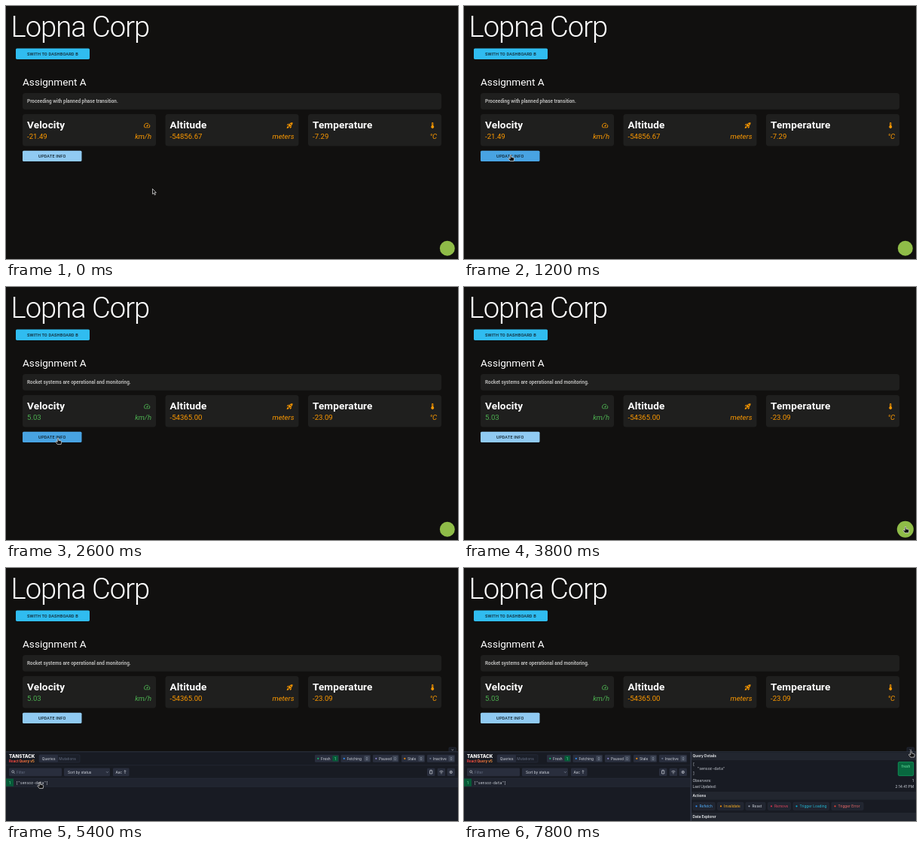
An HTML page for the animation above (8000 ms loop, 600x337 px).

```html
<!DOCTYPE html>
<html lang="en">
<head>
<meta charset="utf-8">
<title>Dashboard</title>
<style>
html, body { margin: 0; width: 100%; height: 100%; overflow: hidden; background: #11100f; }
svg { display: block; width: 100%; height: 100%; }
text { font-family: Roboto, sans-serif; white-space: pre; }
.ui text { font-family: Inter, sans-serif; }
.ui text.mono { font-family: "Noto Sans Mono", monospace; }
</style>
</head>
<body>
<svg id="stage" viewBox="0 0 600 337" preserveAspectRatio="none"></svg>
<script>
const LOOP = 8000, STEP = 200;
const UPDATE = 1600, OPEN = 4000, LABELS = 4200, DETAILS = 5600;
const ORANGE = '#fb9800', GREEN = '#4caf50';
const LINE = '#2b303f', PANEL = '#181b23', FIELD = '#292e3d', PALE = '#d0d5dd';

const rect = (x, y, w, h, fill, r = 0, extra = '') =>
  `<rect x="${x}" y="${y}" width="${w}" height="${h}" rx="${r}" fill="${fill}" ${extra}/>`;
const text = (x, y, size, fill, str, extra = '') =>
  `<text x="${x}" y="${y}" font-size="${size}" fill="${fill}" ${extra}>${str}</text>`;
const path = (d, extra) => `<path d="${d}" ${extra}/>`;
const BOLD = 'font-weight="700"', SEMI = 'font-weight="600"', MED = 'font-weight="500"';
const END = 'text-anchor="end"', MID = 'text-anchor="middle"';

const ICONS = {
  speed: 'M20.38 8.57l-1.23 1.85a8 8 0 0 1-.22 7.58H5.07A8 8 0 0 1 15.58 6.85l1.85-1.23A10 10 0 0 0 3.35 19a2 2 0 0 0 1.72 1h13.85a2 2 0 0 0 1.74-1 10 10 0 0 0-.27-10.44zm-9.79 6.84a2 2 0 0 0 2.83 0l5.66-8.49-8.49 5.66a2 2 0 0 0 0 2.83z',
  rocket: 'M9.2 6.3C7.2 8.6 5.8 11.9 5.6 12.2L2 10.7l4-4c.5-.5 1.2-.7 1.9-.6zM11.2 17s3.7-1.6 5.9-3.7c5.4-5.4 4.5-9.6 4.2-10.6-1-.3-5.2-1.2-10.6 4.2C8.5 9.1 7 12.8 7 12.8zm6.5-2.2c-2.3 2-5.6 3.4-5.9 3.6L13.3 22l4-4c.5-.5.7-1.2.6-1.9zM9 18c0 .8-.3 1.6-.9 2.1C6.9 21.3 2 22 2 22s.7-4.9 1.9-6.1A3 3 0 0 1 9 18zm4-9a2 2 0 1 1 4 0 2 2 0 0 1-4 0z',
  thermo: 'M15 13V5a3 3 0 0 0-6 0v8a5 5 0 1 0 6 0zm-4-8a1 1 0 0 1 2 0h-1v1h1v2h-1v1h1v2h-2z'
};

function card(x, title, value, unit, icon, color) {
  return rect(x, 144, 177, 42.5, '#1f1f1e', 3.5) +
    text(x + 6, 163.3, 13.6, '#fff', title, BOLD + ' letter-spacing=".1"') +
    path(ICONS[icon], `transform="translate(${x + 160.4} 154.2) scale(.4)" fill="${color}" fill-rule="evenodd"`) +
    text(x + 6, 177, 9.6, color, value) +
    text(x + 171, 177, 9.6, color, unit, END + ' font-style="italic"');
}

function button(x, y, w, fill, label) {
  return rect(x, y + .6, w, 14.4, '#000', 1.6, 'opacity=".3"') +
    rect(x, y, w, 14.4, fill, 1.6) +
    text(x + w / 2, y + 9.2, 5.6, '#10222c', label, `${MID} ${MED} letter-spacing=".15"`);
}

function page(t, hover) {
  const fresh = t >= UPDATE;
  return text(6.5, 41.4, 38.2, '#fff', 'Lopna Corp', 'font-weight="300" letter-spacing="-1"') +
    button(13, 56.5, 98, '#30bcf0', 'SWITH TO DASHBOARD B') +
    text(22, 106, 13.6, '#fff', 'Assignment A') +
    rect(22, 116, 556, 21.8, '#1f1f1e', 3.5) +
    text(28, 129.3, 6.4, '#b9b9b8', fresh ? 'Rocket systems are operational and monitoring.' : 'Proceeding with planned phase transition.', BOLD) +
    card(22, 'Velocity', fresh ? '5.03' : '-21.49', 'km/h', 'speed', fresh ? GREEN : ORANGE) +
    card(211.5, 'Altitude', fresh ? '-54365.00' : '-54856.67', 'meters', 'rocket', ORANGE) +
    card(401, 'Temperature', fresh ? '-23.09' : '-7.29', '°C', 'thermo', ORANGE) +
    button(22, 192.7, 78.5, hover ? '#48a3e2' : '#90caf2', 'UPDATE INFO');
}

const STATES = [
  // left, width, label, count, dot
  [410, 32, 'Fresh', 1, '#12b76a'], [444.5, 39.5, 'Fetching', 0, '#2e90fa'],
  [487, 34.5, 'Paused', 0, '#8a83c9'], [525, 31, 'Stale', 0, '#f79009'], [559, 37, 'Inactive', 0, '#667085']
];

function pill([x, w, label, count, dot], shift, full) {
  x += shift;
  const on = count > 0;
  return rect(x, 248.8, w, 10, FIELD, 1.2) +
    `<circle cx="${x + 4.3}" cy="253.8" r="1.1" fill="${dot}"/>` +
    rect(x + w - 8.6, 250, 7.4, 7.6, on ? '#075a38' : '#3f4656', 1) +
    (full ? text(x + 8, 255.5, 4.8, PALE, label) +
      text(x + w - 4.9, 255.5, 4.8, on ? '#6ce9a6' : '#98a2b3', count, MID) : '');
}

function tools(shift) {
  const ink = `fill="none" stroke="${PALE}" stroke-width=".7"`;
  return [559, 572.7, 585.5].map(x => rect(x + shift, 266.8, 10.4, 10.2, FIELD, 1.2)).join('') +
    `<g transform="translate(${shift})">` +
    path('M562 270h4.4M562.6 270.4v3.6h3.2v-3.6M563.4 269.2h1.6', ink) +
    path('M575.4 271.2q2.5-2 5 0M576.6 272.6q1.3-1 2.6 0M577.9 273.4v1', ink) +
    `<circle cx="590.7" cy="271.9" r="1.7" ${ink}/><circle cx="590.7" cy="271.9" r=".5" ${ink}/></g>`;
}

function list(t, hover) {
  const full = t >= LABELS, shift = t >= DETAILS ? -300 : 0;
  const tab = full ? 44 : 49.3, sort = full ? 61 : 64, asc = full ? 142 : 144.2;
  const width = shift ? 300.5 : 600;
  let s = rect(0, 280, width, 11, hover || shift ? '#20242f' : '#1c1f29') +
    rect(0, 262.6, width, .5, LINE) + rect(0, 279.8, width, .5, LINE) + rect(0, 291, width, .5, LINE) +
    rect(0, 280.6, 10, 10.2, '#075a38') +
    rect(tab, 248.8, 54, 10, '#1b1f29', 1.2, `stroke="${LINE}" stroke-width=".6"`) +
    rect(tab, 248.8, 25, 10, FIELD, 1.2) +
    STATES.map(p => pill(p, shift, full)).join('') +
    rect(4, 266.6, 70, 10.6, FIELD, 1.2) +
    `<circle cx="9.2" cy="271.3" r="1.5" fill="none" stroke="${PALE}" stroke-width=".6"/>` +
    path('M10.3 272.4l1.4 1.4', `stroke="${PALE}" stroke-width=".6"`) +
    rect(77, 266.6, sort, 10.6, FIELD, 1.2) +
    path(`M${72 + sort} 271.2l1.4 1.4 1.4-1.4`, 'fill="none" stroke="#98a2b3" stroke-width=".6"') +
    rect(asc, 266.6, 21.5, 10.6, FIELD, 1.2) +
    path(`M${asc + 16} 274v-4.4m-1.3 1.3l1.3-1.3 1.3 1.3`, `fill="none" stroke="${PALE}" stroke-width=".6"`) +
    tools(shift);
  if (full) {
    s += text(4, 253.2, 6.2, '#fff', 'TANSTACK', 'font-weight="800"') +
      text(4, 259, 4.5, 'url(#flame)', 'React Query v5', BOLD) +
      text(47.8, 255.5, 4.8, PALE, 'Queries') +
      text(70.3, 255.5, 4.8, '#667085', 'Mutations') +
      text(14, 273.6, 4.8, '#667085', 'Filter') +
      text(82, 273.6, 4.8, PALE, 'Sort by status') +
      text(145.5, 273.6, 4.8, PALE, 'Asc') +
      text(5, 287.6, 4.8, '#6ce9a6', 1, MID) +
      text(13, 287.5, 4.8, PALE, '["sensor-data"]', 'class="mono"');
  }
  return s;
}

const ACTIONS = [
  [304, 29, 'Refetch', '#53b1fd', '#2e90fa'], [336.5, 34.5, 'Invalidate', '#fdb022', '#f79009'],
  [374, 26, 'Reset', PALE, '#98a2b3'], [403.5, 30, 'Remove', '#e0475f', '#d92d4a'],
  [437, 47.5, 'Trigger Loading', '#22b8d6', '#06aed4'], [488, 42, 'Trigger Error', '#ef6a6a', '#f04438']
];

function details() {
  const band = (y, label) => rect(302, y, 298, 10.6, '#22262f') + text(303.5, y + 7, 4.8, '#f2f4f7', label, SEMI);
  const code = (x, y, s) => text(x, y, 4.8, PALE, s, 'class="mono"');
  const row = (y, a, b) => text(303.5, y, 4.8, PALE, a) + text(597, y, 4.8, PALE, b, END);
  return rect(300.5, 245, 299.5, 92, PANEL) + rect(300.5, 245, 1.5, 92, '#343a4a') +
    band(245.4, 'Query Details') +
    code(303.5, 262.6, '[') + code(309.3, 269.4, '"sensor-data"') + code(303.5, 275.4, ']') +
    rect(576.3, 258.3, 20.4, 18.4, '#08683f', 1.6, 'stroke="#12b76a" stroke-width=".6"') +
    text(586.5, 266, 4.8, '#6ce9a6', 'fresh', MID) +
    row(284.6, 'Observers:', '1') + row(292.8, 'Last Updated:', '2:14:41 PM') +
    band(298, 'Actions') +
    ACTIONS.map(([x, w, label, ink, dot]) =>
      rect(x, 312.3, w, 10, '#212530', 1.2, `stroke="${LINE}" stroke-width=".5"`) +
      `<circle cx="${x + 4.5}" cy="317.3" r="1.1" fill="${dot}"/>` +
      text(x + 8.6, 319, 4.8, ink, label)).join('') +
    band(326, 'Data Explorer');
}

function panel(t, hover) {
  return '<g class="ui">' +
    rect(588, 239, 9.4, 6.4, PANEL, 1, `stroke="${LINE}" stroke-width=".6"`) +
    path('M591.3 241.5l1.4 1.4 1.4-1.4', `fill="none" stroke="${PALE}" stroke-width=".6"`) +
    rect(0, 244.6, 600, 92.4, PANEL) + rect(0, 244.4, 600, .8, '#343a4a') +
    list(t, hover) + (t >= DETAILS ? details() : '') + '</g>';
}

// Pointer keys: time, x, y
const MOVES = [
  [200, 194.5, 243.5], [1000, 62, 198], [1200, 62, 198], [2400, 69, 201], [2600, 69, 201],
  [3600, 586, 319], [4200, 586, 319], [5200, 45, 285], [6000, 45, 285],
  [7000, 510, 312], [7400, 562, 284], [7800, 593.5, 243.5]
];

function pointer(t) {
  const i = MOVES.findIndex(k => k[0] > t);
  if (i === 0) return MOVES[0].slice(1);
  if (i < 0) return MOVES[MOVES.length - 1].slice(1);
  const [t0, x0, y0] = MOVES[i - 1], [t1, x1, y1] = MOVES[i];
  const u = (t - t0) / (t1 - t0), e = u * u * (3 - 2 * u);
  return [x0 + (x1 - x0) * e, y0 + (y1 - y0) * e];
}

const ARROW = 'M0 0v7l1.6-1.4 1.2 2.6 1.2-.5-1.2-2.6h2.1z';
const HAND = 'M-.8.7q.8-1.1 1.6 0v2.6l3 .7q1 .3.9 1.4l-.6 3.2h-4.8l-2.4-3.1q0-1.1 1.2-.8l1.1.8z';

const stage = document.getElementById('stage');
const DEFS = '<defs><linearGradient id="flame"><stop stop-color="#f4373f"/><stop offset="1" stop-color="#ff9a3c"/></linearGradient></defs>';

function draw(t) {
  const [x, y] = pointer(t);
  const over = (x0, y0, x1, y1) => x >= x0 && x <= x1 && y >= y0 && y <= y1;
  const onButton = over(22, 192, 100.5, 207);
  const onLogo = t < LABELS && over(576, 313, 596, 333);
  const onRow = t >= OPEN && over(0, 280, t >= DETAILS ? 300 : 600, 291);
  const onAction = t >= DETAILS && over(304, 312, 530, 322);
  const onClose = t >= OPEN && over(588, 239, 598, 246);
  const hand = onButton || onLogo || onRow || onAction || onClose;
  stage.innerHTML = DEFS + rect(0, 0, 600, 337, '#11100f') + page(t, onButton) +
    (t >= OPEN ? panel(t, onRow) : '') +
    (t < LABELS ? `<circle cx="585.8" cy="322.8" r="${onLogo ? 11 : 10}" fill="#8fbc48"/>` : '') +
    path(hand ? HAND : ARROW, `transform="translate(${x} ${y})" fill="#111" stroke="#e8e8e8" stroke-width=".7" stroke-linejoin="round"`);
}

let last = -1;
function tick() {
  const t = Math.floor(performance.now() % LOOP / STEP) * STEP;
  if (t !== last) draw(last = t);
  requestAnimationFrame(tick);
}
tick();
</script>
</body>
</html>
```
